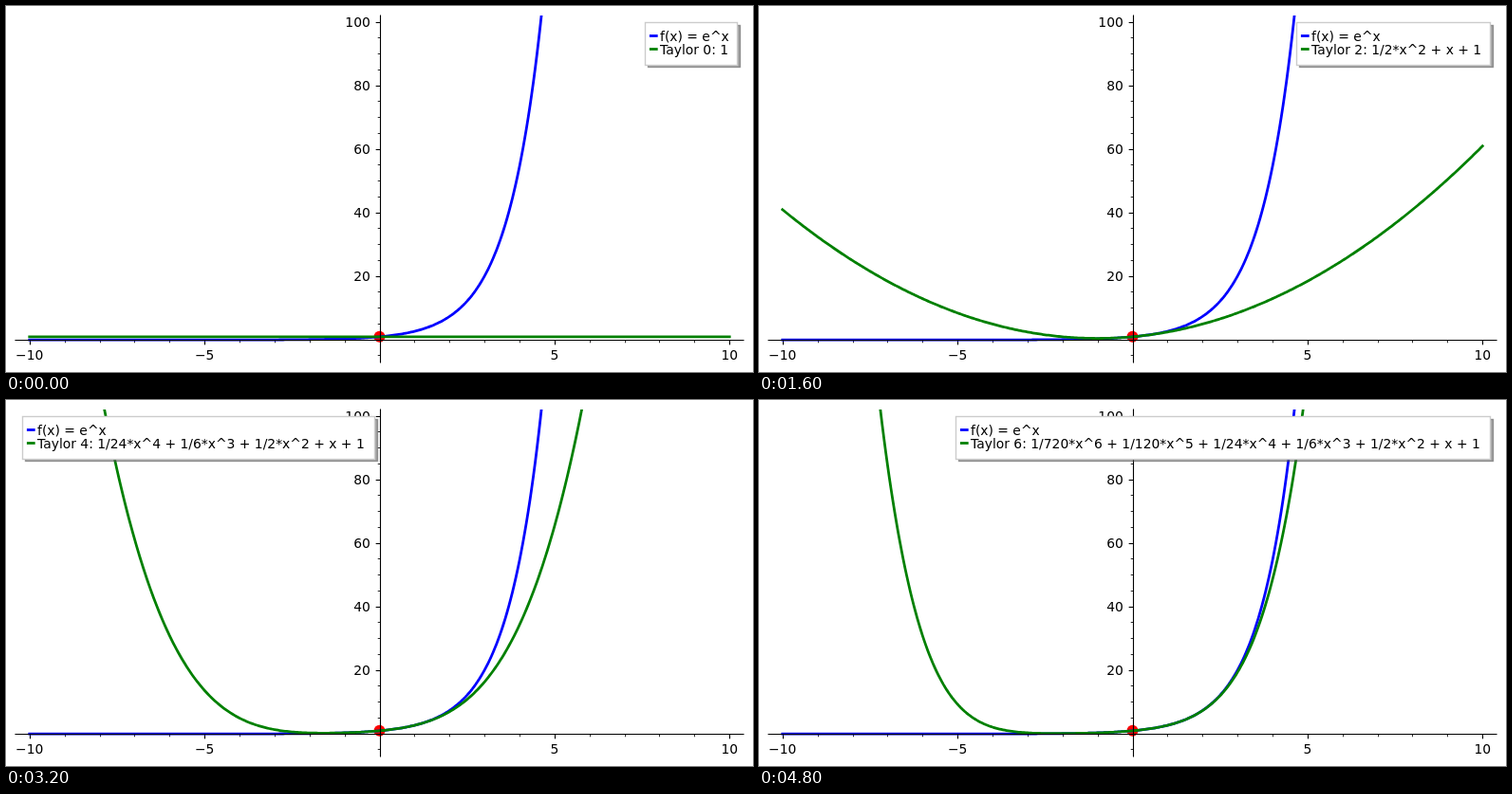
Recreate the animation shown at these times as an HTML page with a canvas. Size 787 px wide and 386 px high, loop 5600 ms.

```html
<!DOCTYPE html>
<html lang="en">
<head>
<meta charset="utf-8">
<title>Taylor polynomials of e^x</title>
<style>
  html, body { margin: 0; width: 100%; height: 100%; overflow: hidden; background: #fff; }
  canvas { display: block; }
</style>
</head>
<body>
<canvas id="stage" width="787" height="386"></canvas>
<script>
const ctx = document.getElementById('stage').getContext('2d');

const STEP_MS = 800;
const ORDERS = 7;
const PT = 100 / 72;
const BOX = { left: 10, top: 10, right: 777, bottom: 376 };
const X_LIMIT = 10.4, Y_MIN = -7.1, Y_MAX = 102.1;
const BLUE = '#0000ff', GREEN = '#008000';

const px = x => BOX.left + (x + X_LIMIT) / (2 * X_LIMIT) * (BOX.right - BOX.left);
const py = y => BOX.top + (Y_MAX - y) / (Y_MAX - Y_MIN) * (BOX.bottom - BOX.top);
const snap = v => Math.floor(v) + 0.5;
const AXIS_X = 394.5, AXIS_Y = snap(py(0));

// Horizontal extent of the legend for each order.
const LEGENDS = [[673, 770], [645, 770], [566, 770], [17, 300], [17, 388], [17, 485], [207, 770]];

function factorial(n) {
  return n < 2 ? 1 : n * factorial(n - 1);
}

function taylor(order, x) {
  let sum = 1;
  for (let k = 1, term = 1; k <= order; k++) sum += term *= x / k;
  return sum;
}

function taylorLabel(order) {
  const terms = [];
  for (let k = order; k > 1; k--) terms.push(`1/${factorial(k)}*x^${k}`);
  if (order > 0) terms.push('x');
  return `Taylor ${order}: ${[...terms, '1'].join(' + ')}`;
}

function line(x1, y1, x2, y2, color, width, cap = 'butt') {
  ctx.strokeStyle = color;
  ctx.lineWidth = width;
  ctx.lineCap = cap;
  ctx.beginPath();
  ctx.moveTo(x1, y1);
  ctx.lineTo(x2, y2);
  ctx.stroke();
}

function text(label, x, y, align) {
  ctx.fillStyle = '#000';
  ctx.textAlign = align;
  ctx.fillText(label, x, y);
}

function drawTicks() {
  const major = 3.5 * PT, minor = 2 * PT;
  for (let x = -10; x <= 10; x++) {
    if (!x) continue;
    const isMajor = x % 5 === 0;
    const at = snap(px(x) + 0.5);
    line(at, AXIS_Y, at, AXIS_Y + (isMajor ? major : minor), '#000', isMajor ? 1.11 : 0.83);
    if (isMajor) text(String(x).replace('-', '\u2212'), px(x), 373, 'center');
  }
  for (let y = -5; y <= 100; y += 5) {
    if (!y) continue;
    const isMajor = y % 20 === 0;
    const at = snap(py(y));
    line(AXIS_X, at, AXIS_X - (isMajor ? major : minor), at, '#000', isMajor ? 1.11 : 0.83);
    if (isMajor) text(y, px(0) - 9.7, Math.round(py(y) + 5), 'right');
  }
}

function drawCurve(fn, color) {
  ctx.strokeStyle = color;
  ctx.lineWidth = 2 * PT;
  ctx.lineCap = 'square';
  ctx.lineJoin = 'round';
  ctx.beginPath();
  for (let i = 0; i <= 400; i++) {
    const x = -10 + i / 20;
    ctx.lineTo(px(x), py(fn(x)));
  }
  ctx.stroke();
}

function drawPlot(order) {
  ctx.save();
  ctx.beginPath();
  ctx.rect(BOX.left, BOX.top, BOX.right - BOX.left, BOX.bottom - BOX.top);
  ctx.clip();
  ctx.fillStyle = '#ff0000';
  ctx.beginPath();
  ctx.arc(px(0), py(1), 6, 0, 2 * Math.PI);
  ctx.fill();
  ctx.restore();

  drawTicks();

  ctx.save();
  ctx.beginPath();
  ctx.rect(BOX.left, BOX.top, BOX.right - BOX.left, BOX.bottom - BOX.top);
  ctx.clip();
  drawCurve(Math.exp, BLUE);
  drawCurve(x => taylor(order, x), GREEN);
  ctx.restore();

  line(BOX.left, AXIS_Y, BOX.right, AXIS_Y, '#000', 1.11, 'square');
  line(AXIS_X, BOX.top, AXIS_X, BOX.bottom, '#000', 1.11, 'square');
}

function frame(x, y, w, h, fill, stroke) {
  ctx.lineWidth = PT;
  ctx.lineJoin = 'miter';
  ctx.fillStyle = fill;
  ctx.strokeStyle = stroke;
  ctx.fillRect(x, y, w, h);
  ctx.strokeRect(x, y, w, h);
}

function drawLegend(order) {
  const [left, right] = LEGENDS[order];
  const width = right - left;
  const shade = 'rgba(77, 77, 77, 0.5)';
  frame(left + 3.5, 20.5, width, 44, shade, shade);
  frame(left + 0.5, 17.5, width, 45, '#fff', '#ccc');

  const entry = (label, color, y) => {
    line(left + 6.3, y - 5.5, left + 12.3, y - 5.5, color, 2 * PT, 'square');
    text(label, left + 16, y, 'left');
  };
  entry('f(x) = e^x', BLUE, 37);
  entry(taylorLabel(order), GREEN, 51);
}

function render(now) {
  const order = Math.floor(now / STEP_MS) % ORDERS;
  ctx.fillStyle = '#fff';
  ctx.fillRect(0, 0, 787, 386);
  ctx.font = `${10 * PT}px "DejaVu Sans", sans-serif`;
  drawPlot(order);
  drawLegend(order);
}

function tick() {
  render(performance.now());
  requestAnimationFrame(tick);
}
tick();
</script>
</body>
</html>
```
